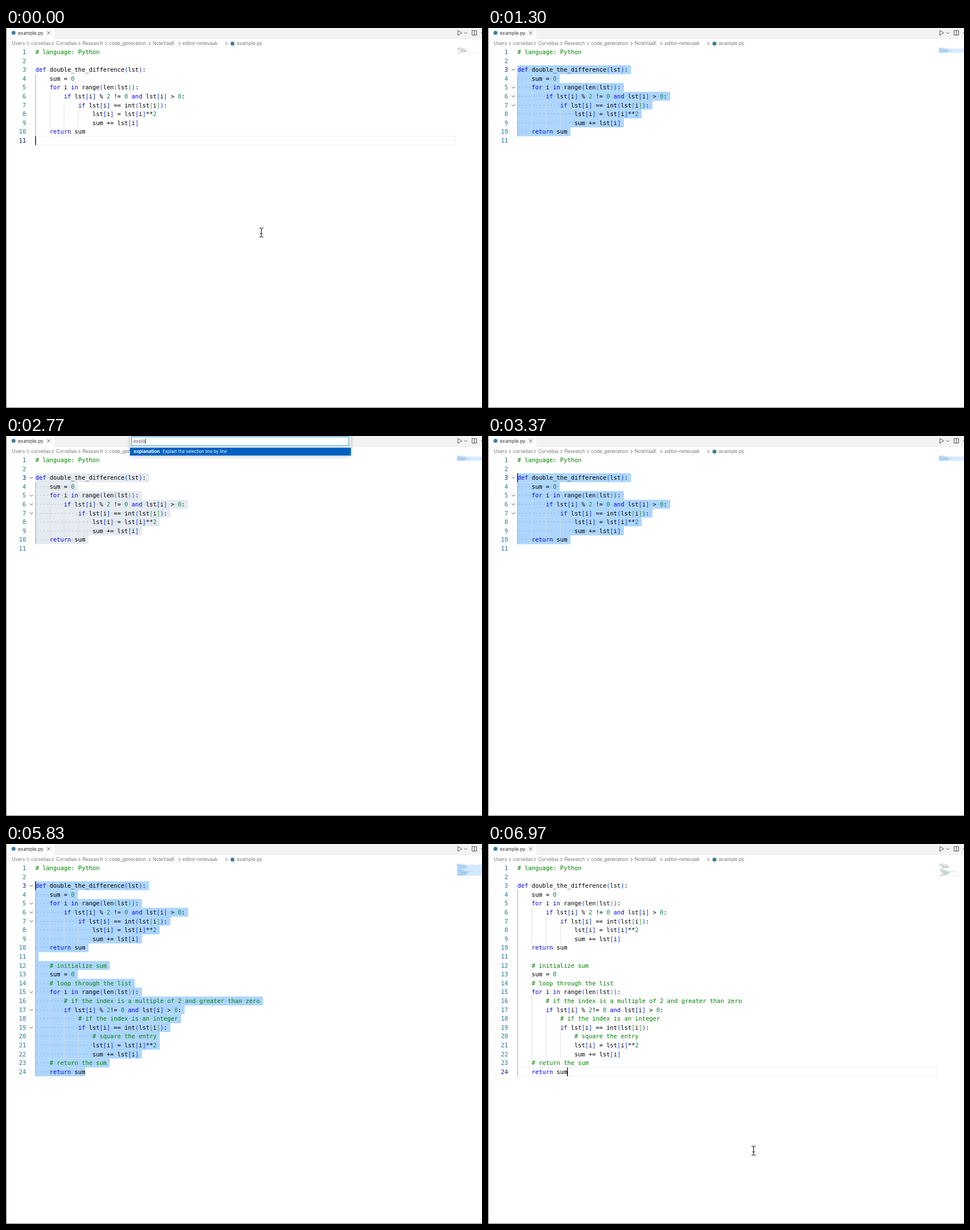
Animation of 837x669 px, one loop 7000 ms. Source, as an HTML page:

```html
<!DOCTYPE html>
<html lang="en">
<head>
<meta charset="utf-8">
<title>Editor</title>
<style>
  html, body { margin: 0; width: 100%; height: 100%; overflow: hidden; background: #fff; }
  svg { display: block; width: 100%; height: 100%; }
  text { white-space: pre; font: 8.25px Inter, Roboto, sans-serif; }
  .code { font: 10.41px "DejaVu Sans Mono", "Liberation Mono", monospace; fill: #000; }
  .dots { fill: #333; fill-opacity: .25; }
  .icon { fill: none; stroke: #424242; stroke-width: .9; }
  .palette { filter: drop-shadow(0 0 3px rgba(0, 0, 0, .25)); }
</style>
</head>
<body>
<svg id="stage" viewBox="0 0 837 669"></svg>
<script>
const LOOP = 7000;
const LEFT = 51.7, TOP = 34.3, ROW = 15.61, CHAR = 6.267;
const MAP_X = 793, MAP_TOP = 34.5, MAP_ROW = 0.9, MAP_CHAR = 0.47;

const SOURCE = `# language: Python

def double_the_difference(lst):
    sum = 0
    for i in range(len(lst)):
        if lst[i] % 2 != 0 and lst[i] > 0:
            if lst[i] == int(lst[i]):
                lst[i] = lst[i]**2
                sum += lst[i]
    return sum

    # initialize sum
    sum = 0
    # loop through the list
    for i in range(len(lst)):
        # if the index is a multiple of 2 and greater than zero
        if lst[i] % 2!= 0 and lst[i] > 0:
            # if the index is an integer
            if lst[i] == int(lst[i]):
                # square the entry
                lst[i] = lst[i]**2
                sum += lst[i]
    # return the sum
    return sum`.split('\n');

const FIRST = 3, SHORT = 11, FULL = SOURCE.length;
const TIME = {
  drag: 360, selected: 620, pointerHidden: 830, open: 1430, close: 2930,
  insert: 5670, unhover: 6400, pointerShown: 6670, click: 6830
};
const KEYS = [1800, 1970, 2130, 2330, 2530];
const PATH = [[30, 449, 360], [330, 50, 198], [360, 50, 198], [620, 50, 74]];

const stage = document.getElementById('stage');

function el(tag, attrs, parent = stage, text) {
  const node = document.createElementNS('http://www.w3.org/2000/svg', tag);
  for (const key in attrs) node.setAttribute(key, attrs[key]);
  if (text !== undefined) node.textContent = text;
  parent.append(node);
  return node;
}
const box = (x, y, width, height, fill, parent) => el('rect', { x, y, width, height, fill }, parent);
const label = (x, y, text, fill, parent) => el('text', { x, y, fill }, parent, text);
const icon = (d, attrs = {}, parent) => el('path', { d, class: 'icon', ...attrs }, parent);
const show = (node, on) => node.setAttribute('visibility', on ? 'inherit' : 'hidden');
const rowTop = n => TOP + (n - 1) * ROW;
const baseline = n => rowTop(n) + 11.6;
const indentOf = n => SOURCE[n - 1].search(/\S|$/);
const isComment = n => SOURCE[n - 1].trim().startsWith('#');

// Width of a selected row, including its line break.
function selWidth(n) {
  if (n < FIRST || n > FULL) return 0;
  return SOURCE[n - 1].length * CHAR + (n < FULL ? 5.6 : 0);
}

function selPath(n) {
  const w = selWidth(n);
  const a = selWidth(n - 1) < w ? 2.5 : 0, b = selWidth(n + 1) < w ? 2.5 : 0;
  return `M${LEFT} ${rowTop(n)}h${w - a}q${a} 0 ${a} ${a}v${ROW + .1 - a - b}q0 ${b} ${-b} ${b}h${b - w}z`;
}

function codeLine(n, parent) {
  const line = SOURCE[n - 1];
  const text = el('text', { x: LEFT, y: baseline(n), class: 'code' }, parent);
  const span = (s, fill) => el('tspan', { fill }, text, s);
  const brackets = ['#0431fa', '#319331', '#7b3814'];
  let depth = 0;
  for (const [s] of line.matchAll(/#.*|[A-Za-z_]+|\d+|[()[\]]|\s+|[^\w\s()[\]#]+/g)) {
    if (s[0] === '#') span(s, '#008000');
    else if (/^(def|for|in|if|and|return)$/.test(s)) span(s, '#0000e6');
    else if (/^\d/.test(s)) span(s, '#098658');
    else if (/^[([]$/.test(s)) span(s, brackets[depth++]);
    else if (/^[)\]]$/.test(s)) span(s, brackets[--depth]);
    else span(s, '#000');
  }
}

// Tab bar and breadcrumbs
box(0, 0, 837, 669, '#fff');
box(85, 0, 752, 20, '#f3f3f3');
const fileMark = (cx, cy) => el('circle', { cx, cy, r: 3.5, fill: '#3b7f9f' });
fileMark(13.2, 8.5);
label(21, 11.5, 'example.py', '#333');
icon('M72.2 5.7l5.6 5.6m0 -5.6l-5.6 5.6');
icon('M794.5 4.3l7 4.3l-7 4.3z');
icon('M806 7.6l2.4 2.4l2.4 -2.4', { stroke: '#888' });
icon('M819.5 4.5h8v8h-8zM823.5 4.5v8');
box(835.8, 8, 1.2, 1.2, '#424242');

const CRUMBS = [[10.5, 'Users'], [44, 'corvelias'], [88, 'Corvelias'], [134.5, 'Research'],
  [181.3, 'code_generation'], [258, 'NoteVaaK'], [310.5, 'editor-notevaak']];
CRUMBS.forEach(([x, name], i) => {
  label(x, 30.3, name, '#777');
  const next = i + 1 < CRUMBS.length ? CRUMBS[i + 1][0] : 393;
  icon(`M${next - 7} 24.6l2.7 2.8l-2.7 2.8`, { stroke: '#777' });
});
fileMark(398.2, 27.5);
label(406, 30.3, 'example.py', '#777');

// Editor rows
const lineMark = el('rect', { x: LEFT, width: 737.5, height: ROW, fill: 'none', stroke: '#eee' });
const selection = el('g', {});
const guides = el('g', {});
const content = el('g', {});
const rows = SOURCE.map((line, i) => {
  const n = i + 1;
  const row = { n, g: el('g', {}, content) };
  row.sel = el('path', { d: selPath(n) }, selection);
  row.number = el('text', { x: 35.2, y: baseline(n), class: 'code', 'text-anchor': 'end' }, stage, n);
  row.guides = el('g', {}, guides);
  const levels = n === SHORT ? 1 : indentOf(n) / 4;
  for (let k = 0; k < levels; k++) {
    box(LEFT - .2 + k * 4 * CHAR, rowTop(n), .9, ROW + .1, k ? '#dcdcdc' : '#999', row.guides);
  }
  codeLine(n, row.g);
  row.dots = el('text', { x: LEFT, y: baseline(n), class: 'code dots' }, row.g,
    line.replace(/./g, c => c === ' ' ? '·' : ' '));
  if (line.endsWith(':')) {
    row.fold = icon(`M41.8 ${rowTop(n) + 6.6}l2.8 2.8l2.8 -2.8`, { stroke: '#555' });
  }
  return row;
});
const caret = box(0, 0, 1.3, ROW, '#000');

// Minimap
const mapBand = box(MAP_X, MAP_TOP + 2 * MAP_ROW, 44, 0, '#d3e9ff');
const mapLine = box(MAP_X, 0, 44, .7, '#dde3ea');
for (const row of rows) {
  const y = MAP_TOP + (row.n - 1) * MAP_ROW;
  row.map = el('g', {});
  row.mapSel = box(MAP_X, y, selWidth(row.n) / CHAR * MAP_CHAR, MAP_ROW, '#a9d2fa');
  for (const m of SOURCE[row.n - 1].matchAll(/\S+/g)) {
    const bar = box(MAP_X + m.index * MAP_CHAR, y + .1, m[0].length * MAP_CHAR, .6,
      isComment(row.n) ? '#2f8a2f' : '#444', row.map);
    bar.setAttribute('opacity', .5);
  }
}

// Command palette
const palette = el('g', {});
const panel = box(218, -4, 388.5, 40, '#f3f3f3', palette);
panel.setAttribute('class', 'palette');
el('rect', { x: 220.5, y: 1.5, width: 382.5, height: 15.5, fill: '#fff', stroke: '#1b93c4' }, palette);
box(218, 20.5, 388.5, 14, '#0060c0', palette);
const query = label(224, 12.4, '', '#616161', palette);
const queryCaret = box(0, 4.5, .9, 9.5, '#222', palette);
label(224.5, 30.4, 'explanation', '#fff', palette).style.cssText = 'font-size:8.05px;font-weight:700';
label(275.5, 30.3, 'Explain the selection line by line', '#fff', palette).style.fontSize = '7.5px';

// Window edges and pointer
box(0, 0, 1, 669, '#777');
box(0, 668, 837, 1, '#777');
const pointer = el('g', {});
for (const [stroke, width] of [['#fff', 3], ['#111', 1.4]]) {
  icon('M-3.5 -8.3Q0 -8.3 0 -5.5V5.5Q0 8.3 -3.5 8.3M3.5 -8.3Q0 -8.3 0 -5.5M0 5.5Q0 8.3 3.5 8.3M-2 2H2',
    { stroke, 'stroke-width': width }, pointer);
}

function pointerAt(t) {
  if (t >= TIME.pointerHidden) return [467, 540];
  const i = PATH.findIndex(p => t < p[0]);
  if (i === 0) return PATH[0].slice(1);
  if (i < 0) return PATH[PATH.length - 1].slice(1);
  const [t0, x0, y0] = PATH[i - 1], [t1, x1, y1] = PATH[i];
  const u = (t - t0) / (t1 - t0), e = u * u * (3 - 2 * u);
  return [x0 + (x1 - x0) * e, y0 + (y1 - y0) * e];
}

function render(t) {
  const [px, py] = pointerAt(t);
  const inserted = t >= TIME.insert, clicked = t >= TIME.click;
  const asking = t >= TIME.open && t < TIME.close;
  const hovering = t >= 330 && t < TIME.unhover;
  const lastRow = inserted ? FULL : SHORT;
  const selEnd = inserted ? FULL : SHORT - 1;

  let active = FIRST;
  if (clicked) active = FULL;
  else if (t < TIME.drag) active = SHORT;
  else if (t < TIME.selected) active = Math.floor((py - TOP) / ROW) + 1;
  const selecting = !clicked && active <= selEnd;

  for (const row of rows) {
    const visible = row.n <= lastRow;
    const selected = selecting && row.n >= active && row.n <= selEnd;
    show(row.g, visible);
    show(row.number, visible);
    show(row.map, visible);
    show(row.guides, visible && (inserted || row.n < SHORT));
    show(row.sel, selected);
    show(row.dots, selected);
    show(row.mapSel, selected);
    if (row.fold) show(row.fold, visible && hovering);
    row.number.style.fill = row.n === active ? '#0b216f' : '#237893';
  }
  selection.setAttribute('fill', asking ? '#e5ebf1' : '#add6ff');

  show(lineMark, !selecting);
  lineMark.setAttribute('y', rowTop(active));
  const steady = t < TIME.selected || clicked;
  show(caret, !asking && (steady || Math.floor((t - 370) / 500) % 2 === 0));
  caret.setAttribute('x', LEFT - .4 + (clicked ? SOURCE[FULL - 1].length * CHAR : 0));
  caret.setAttribute('y', rowTop(active));

  show(mapBand, selecting);
  mapBand.setAttribute('y', MAP_TOP + (active - 1) * MAP_ROW);
  mapBand.setAttribute('height', Math.max(0, selEnd - active + 1) * MAP_ROW);
  show(mapLine, !selecting);
  mapLine.setAttribute('y', MAP_TOP + (active - 1) * MAP_ROW + .2);

  show(palette, asking);
  const typed = 'expla'.slice(0, KEYS.filter(k => t >= k).length);
  if (query.textContent !== typed) query.textContent = typed;
  queryCaret.setAttribute('x', 224.2 + (typed ? query.getComputedTextLength() : 0));

  show(pointer, t < TIME.pointerHidden || t >= TIME.pointerShown);
  pointer.setAttribute('transform', `translate(${px} ${py})`);
}

const start = performance.now();
function tick() {
  render((performance.now() - start) % LOOP);
  requestAnimationFrame(tick);
}
tick();
</script>
</body>
</html>
```
